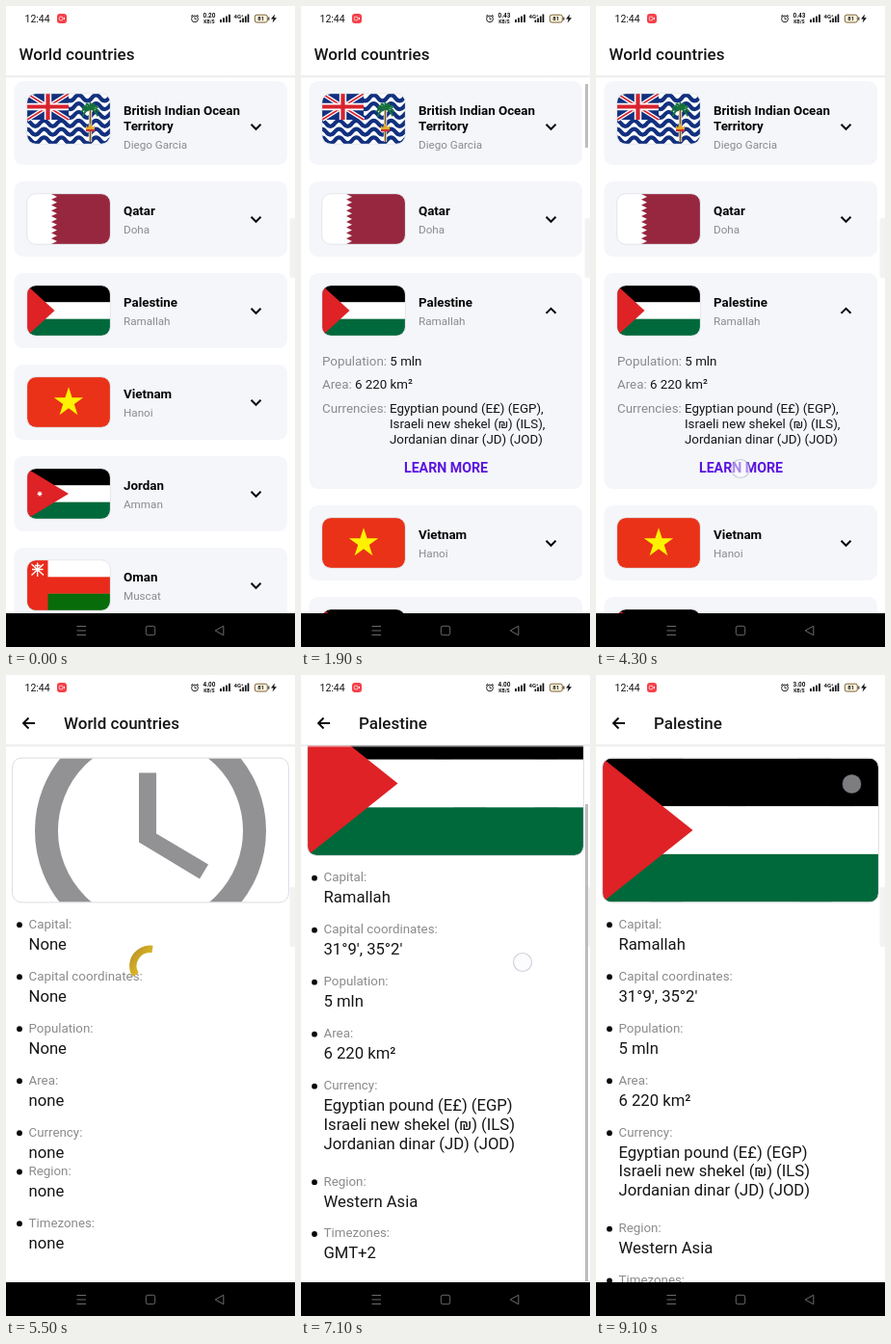
These frames come from a looping animation (300x665 px, 9.5 s). An HTML page:

```html
<!DOCTYPE html>
<html lang="en">
<head>
<meta charset="utf-8">
<title>World countries</title>
<style>
  html, body { margin: 0; width: 100%; height: 100%; overflow: hidden; background: #fff; }
  svg { display: block; width: 100%; height: 100%; }
  text { font-family: Roboto, sans-serif; fill: #151515; white-space: pre; }
  .title { font-size: 17px; font-weight: 500; }
  .name { font-size: 13.33px; font-weight: 700; fill: #050505; }
  .sub { font-size: 11.67px; fill: #8b8b8d; }
  .body { font-size: 13.33px; }
  .label { font-size: 13.33px; fill: #8b8b8d; }
  .value { font-size: 16.67px; }
  .more { font-size: 14.2px; font-weight: 700; fill: #5a14e0; }
  .tiny { font-size: 6.4px; font-weight: 700; }
</style>
</head>
<body>
<svg id="stage" viewBox="0 0 300 665"></svg>
<script>
const LOOP = 9500, STEP = 100, OPEN = 146, SCROLL = 48.5;
const RED = '#de2226', GREEN = '#00693b', NAVY = '#12307f';

const text = (x, y, s, cls, extra = '') => `<text x="${x}" y="${y}" class="${cls}" ${extra}>${s}</text>`;
const rect = (x, y, w, h, fill, extra = '') =>
  `<rect x="${x}" y="${y}" width="${w}" height="${h}" fill="${fill}" ${extra}/>`;
const path = (d, fill, extra = '') => `<path d="${d}" fill="${fill}" ${extra}/>`;
const line = (d, color, w, extra = '') => path(d, 'none', `stroke="${color}" stroke-width="${w}" ${extra}`);

function star(cx, cy, n, outer, inner, fill) {
  const pts = Array.from({ length: 2 * n }, (_, i) => {
    const r = i % 2 ? inner : outer, a = i * Math.PI / n - Math.PI / 2;
    return (cx + r * Math.cos(a)).toFixed(2) + ',' + (cy + r * Math.sin(a)).toFixed(2);
  });
  return `<polygon points="${pts.join(' ')}" fill="${fill}"/>`;
}

// Flags fill a w by h box at the origin.
const stripes = (w, h, colors) =>
  colors.map((c, i) => rect(0, i * h / 3, w, h / 3 + .2, c)).join('');

const tricolor = (w, h, tip) =>
  stripes(w, h, ['#000', '#fff', GREEN]) + path(`M0 0L${tip} ${h / 2}L0 ${h}Z`, RED);

function oceanFlag() {
  let s = rect(0, 0, 86, 53, '#fff');
  for (let i = 0; i < 6; i++) {
    s += line(`M-5 ${4.4 + i * 8.8}q4.5 -6 9 0` + 't9 0'.repeat(10), NAVY, 4.2);
  }
  s += rect(0, 0, 43, 27, NAVY);
  s += line('M0 0L43 27M43 0L0 27', '#fff', 4.4) + line('M0 0L43 27M43 0L0 27', '#d8232e', 1.6);
  s += line('M21.5 0V27M0 13.5H43', '#fff', 7.4) + line('M21.5 0V27M0 13.5H43', '#d8232e', 4.2);
  s += line('M65.5 17V50', '#fff', 3.4) + line('M65.5 17V50', '#7a5a22', 1.8);
  for (let i = 0; i < 9; i++) {
    const a = (150 + i * 30) * Math.PI / 180, x = Math.cos(a) * 9, y = Math.sin(a) * 8.5;
    s += line(`M65.5 16q${x * .6} ${y * .6 - 3} ${x} ${y + 3}`, '#17733a', 2.1);
  }
  return s + path('M61 39v-6l2 2 2.5-4 2.5 4 2-2v6z', '#e2ab2b') + rect(61, 37, 9, 2.2, '#cf3030');
}

function qatarFlag() {
  let d = 'M86 0H25';
  for (let i = 0; i < 9; i++) d += `L31 ${(i + .5) * 52 / 9}L25 ${(i + 1) * 52 / 9}`;
  return rect(0, 0, 86, 52, '#fff') + path(d + 'H86Z', '#97273f');
}

const omanFlag = () => stripes(86, 52, ['#fff', '#ea2a1a', '#086c0a']) + rect(0, 0, 21.5, 52, '#ea2a1a')
  + line('M4.5 4L17 15.5M17 4L4.5 15.5M10.7 2.5V17M5 9.5H16.5M8 5.5H13.5', '#fff', 1.3);

const countries = [
  { names: ['British Indian Ocean', 'Territory'], capital: 'Diego Garcia', top: 78, flag: oceanFlag() },
  { names: ['Qatar'], capital: 'Doha', top: 182, flag: qatarFlag() },
  { names: ['Palestine'], capital: 'Ramallah', top: 277, flag: tricolor(86, 52, 28.5) },
  { names: ['Vietnam'], capital: 'Hanoi', top: 372,
    flag: rect(0, 0, 86, 52, '#e93218') + star(43, 26.2, 5, 16, 6.1, '#fff200') },
  { names: ['Jordan'], capital: 'Amman', top: 467,
    flag: tricolor(86, 52, 43) + star(13, 26, 7, 3.2, 1.5, '#fff') },
  { names: ['Oman'], capital: 'Muscat', top: 562, flag: omanFlag() }
];

function card({ names, capital, top, flag }, i) {
  const dy = names.length > 1 ? 16 : 0, h = 78 + dy * .55;
  return `<g id="card${i}" transform="translate(0 ${top})">`
    + rect(8.5, 0, 283.5, h, '#f4f6fa', `rx="9" id="back${i}"`)
    + `<g transform="translate(22 13)" clip-path="url(#thumb)">${flag}</g>`
    + rect(21.7, 12.8, 86.6, 52.4, 'none', 'rx="9" stroke="#d9dbe0" stroke-width=".6"')
    + names.map((n, k) => text(122, 34.8 + 16 * k, n, 'name')).join('')
    + text(122, 54.3 + dy, capital, 'sub')
    + line('M-5 -2.5L0 2.5L5 -2.5', '#0a0a0a', 2, `id="chev${i}" transform="translate(259.5 ${39.3 + dy / 2})"`)
    + (i === 2 ? `<g clip-path="url(#fold)">${facts}</g>` : '') + '</g>';
}

const fact = (y, label, value) =>
  `<text x="22" y="${y}" class="body"><tspan fill="#8b8b8d">${label}: </tspan>${value}</text>`;
const money = ['Egyptian pound (E£) (EGP)', 'Israeli new shekel (₪) (ILS)', 'Jordanian dinar (JD) (JOD)'];
const facts = fact(95.6, 'Population', '5 mln') + fact(120.3, 'Area', '6 220 km²')
  + fact(145, 'Currencies', money[0] + ',')
  + text(92, 161, money[1] + ',', 'body') + text(92, 177, money[2], 'body')
  + text(150.5, 207, 'LEARN MORE', 'more', 'text-anchor="middle"');

// Each row: label position, label, value lines.
const rows = list => list.map(([y, label, ...values]) =>
  `<circle cx="14" cy="${y + 1.2}" r="2.9" fill="#0a0a0a"/>` + text(23.5, y + 4.6, label + ':', 'label')
  + values.map((v, i) => text(23.5, y + 26.6 + i * 19.8, v, 'value')).join('')).join('');

const emptyRows = rows([
  [258, 'Capital', 'None'], [312, 'Capital coordinates', 'None'], [366, 'Population', 'None'],
  [420, 'Area', 'none'], [474, 'Currency', 'none'], [514.3, 'Region', 'none'], [568, 'Timezones', 'none']
]);
const fullRows = rows([
  [258, 'Capital', 'Ramallah'], [312, 'Capital coordinates', "31°9', 35°2'"], [366, 'Population', '5 mln'],
  [420, 'Area', '6 220 km²'], [474, 'Currency', ...money], [573.5, 'Region', 'Western Asia'],
  [627.3, 'Timezones', 'GMT+2']
]);

const clock = rect(0, 0, 286, 149, '#fff')
  + '<circle cx="143" cy="75" r="108" fill="none" stroke="#929194" stroke-width="24"/>'
  + path('M149 15H131V87L194 125L203 110L149 78Z', '#929194');

const bars = x => [3, 4.7, 6.4, 8.2].map((h, i) => rect(x + i * 3, 17 - h, 1.9, h, '#111')).join('');
const status = text(19.5, 17, '12:44', 'body', 'style="font-size:10.5px"')
  + rect(53, 8, 10, 10, '#f5404a', 'rx="3"') + rect(55.3, 11.2, 3.6, 3.6, 'none', 'rx="1" stroke="#fff" stroke-width=".7"')
  + path('M59.6 12.5l1.4-.8v2.6l-1.4-.8z', '#fff')
  + '<circle cx="196" cy="13.4" r="3.4" fill="none" stroke="#222"/>'
  + line('M196 11.2V13.6H197.8M192 10.8L194 9M200 10.8L198 9', '#222', .9)
  + text(211, 12.4, '', 'tiny', 'id="speed" text-anchor="middle"')
  + text(211, 17.8, 'KB/S', 'tiny', 'text-anchor="middle" style="font-size:5px"')
  + bars(222) + text(236.5, 13, '4G⁺', 'tiny', 'style="font-size:6px"')
  + [242.5, 245.2, 247.9, 250.6].map((x, i) => rect(x, 14.5 - i * 2, 1.7, 2.5 + i * 2, '#111')).join('')
  + rect(258.3, 9.2, 13, 7.8, '#fff6df', 'rx="2" stroke="#6b5120" stroke-width=".9"')
  + rect(272.2, 11.5, 1.2, 3.2, '#333') + text(264.8, 15.4, '81', 'tiny', 'text-anchor="middle" style="font-size:6px"')
  + path('M279 8.5L275 13.6H277.6L276.6 17.5L281 12.2H278.3Z', '#111');

const navBar = rect(0, 630, 300, 35, '#000')
  + line('M73.5 643.5H83M73.5 648H83M73.5 652.5H83', '#6b6b6b', 1)
  + rect(145.3, 643.3, 9.4, 9.4, 'none', 'rx="2" stroke="#6b6b6b"')
  + line('M225.8 643.2V652.8L217.2 648Z', '#6b6b6b', 1, 'stroke-linejoin="round"');

const header = rect(0, 0, 300, 73, '#fff') + rect(0, 72.5, 300, 3, 'url(#shade)');

const stage = document.getElementById('stage');
stage.innerHTML = `<defs>
  <clipPath id="thumb"><rect width="86" height="52" rx="9"/></clipPath>
  <clipPath id="hero"><rect width="286" height="149" rx="9"/></clipPath>
  <clipPath id="fold"><rect id="foldBox" width="300" height="78"/></clipPath>
  <linearGradient id="shade" x2="0" y2="1"><stop stop-color="#dcdcdc"/><stop offset="1" stop-color="#fff" stop-opacity="0"/></linearGradient>
  <linearGradient id="gold" x2="1" y2="1"><stop stop-color="#b8912c"/><stop offset="1" stop-color="#f5d21c"/></linearGradient>
  </defs>${rect(0, 0, 300, 665, '#fff')}
  <g id="list">${countries.map(card).join('')}${header}${text(13.5, 56, 'World countries', 'title')}</g>
  <g id="detail">${rect(0, 0, 300, 665, '#fff')}
    <g id="page">
      <g transform="translate(7 86.5)"><g clip-path="url(#hero)">${clock}<g id="flag">${tricolor(286, 149, 93.5)}</g></g>
      ${rect(-.4, -.4, 286.8, 149.8, 'none', 'rx="9.4" stroke="#d8dade" stroke-width=".9"')}</g>
      <g id="empty">${emptyRows}${line('M152 284.5A17.5 17.5 0 0 0 134.5 311', 'url(#gold)', 7.5, 'id="loader"')}</g>
      <g id="full">${fullRows}</g>
    </g>
    ${header}${line('M30 50H18M23.5 44.5L18 50L23.5 55.5', '#0a0a0a', 1.9)}
    ${text(60, 56, '', 'title', 'id="heading"')}
  </g>
  ${rect(294.5, 220, 6, 62, '#ededee', 'rx="2" opacity=".75"')}
  ${rect(295, 81, 3, 66, '#bdbdbd', 'id="thumbBar"')}
  ${status}${navBar}
  <circle id="touch0" r="9.5"/><circle id="touch1" r="9.5"/>`;

const $ = id => document.getElementById(id);
const set = (id, attrs) => { for (const k in attrs) $(id).setAttribute(k, attrs[k]); };
const ramp = (t, a, b) => Math.min(1, Math.max(0, (t - a) / (b - a)));
const ease = (t, a, b) => { const p = ramp(t, a, b); return p * p * (3 - 2 * p); };

// start, end, from x, y, to x, y
const touches = [
  [1500, 1700, 259.5, 311, 259.5, 311], [2500, 2800, 259.5, 311, 259.5, 311],
  [3400, 3600, 259.5, 311, 259.5, 311], [3500, 3700, 136, 319, 136, 319],
  [4200, 4500, 150, 480, 150, 480], [6300, 6700, 205, 480, 210, 350],
  [7000, 7500, 230, 298, 228, 400], [7800, 8200, 172, 528, 178, 400],
  [8300, 8700, 205, 330, 205, 450], [9000, LOOP, 265.5, 113, 265.5, 113]
];

function draw(t) {
  const open = ease(t, 1500, 1850) - ease(t, 2750, 3150) + ease(t, 3500, 3900);
  const grow = OPEN * open;
  countries.forEach((c, i) => i > 2 && set('card' + i, { transform: `translate(0 ${c.top + grow})` }));
  set('back2', { height: 78 + grow });
  set('foldBox', { height: 78 + grow });
  set('chev2', { transform: `translate(259.5 39.3) scale(1 ${open > .5 ? -1 : 1})` });

  const enter = ease(t, 4300, 4700), loaded = t >= 5600;
  const scroll = ease(t, 6200, 6800) - ease(t, 7100, 7600) + ease(t, 7800, 8200) - ease(t, 8250, 8700);
  set('detail', { opacity: enter, transform: `translate(0 ${24 * (1 - enter)})` });
  set('page', { transform: `translate(0 ${-SCROLL * scroll})` });
  set('flag', { opacity: ramp(t, 5500, 5700) });
  set('empty', { opacity: loaded ? 0 : 1 });
  set('full', { opacity: loaded ? 1 : 0 });
  set('loader', { transform: `rotate(${(t - 5500) * .36} 151.5 302)` });
  $('heading').textContent = loaded ? 'Palestine' : 'World countries';
  $('speed').textContent = t < 1000 ? '0.20' : t < 4600 ? '0.43' : t < 8300 ? '4.00' : '3.00';

  const onDetail = t >= 4400;
  const shown = onDetail
    ? (t >= 6300 ? 1 - ramp(t, 8800, 9100) : 0)
    : ramp(t, 1400, 1600) - ramp(t, 2100, 2600) + ramp(t, 2700, 2900) - ramp(t, 4000, 4300);
  set('thumbBar', { opacity: shown, y: onDetail ? 75 + 59 * scroll : 81, height: onDetail ? 501 - 6 * scroll : 66 });

  const live = touches.filter(([a, b]) => t >= a && t < b);
  for (let i = 0; i < 2; i++) {
    const p = live[i];
    if (!p) { set('touch' + i, { opacity: 0 }); continue; }
    const [a, b, x0, y0, x1, y1] = p, k = ramp(t, a + 100, b);
    set('touch' + i, {
      cx: x0 + (x1 - x0) * k, cy: y0 + (y1 - y0) * k, opacity: 1,
      fill: 'rgba(250,250,253,.5)', stroke: 'rgba(140,145,165,.4)', 'stroke-width': 1.2
    });
  }
}

const begin = performance.now();
function tick() {
  const t = (performance.now() - begin) % LOOP;
  draw(Math.floor(t / STEP) * STEP);
  requestAnimationFrame(tick);
}
tick();
</script>
</body>
</html>
```
